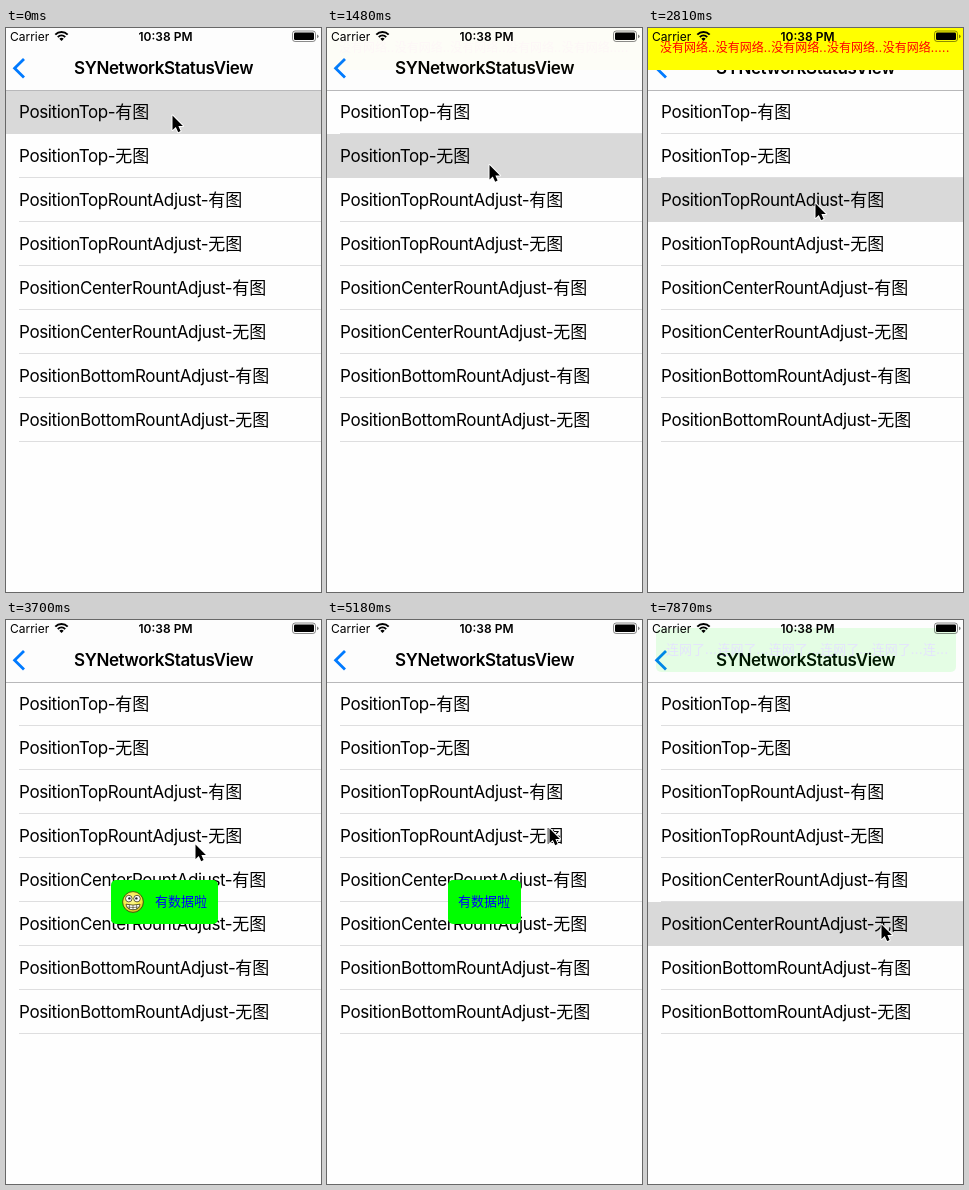
Recreate the animation shown at these times as an HTML page. Size 315 by 564 pixels, loop 8 s.

```html
<!DOCTYPE html>
<html lang="zh-CN">
<head>
<meta charset="utf-8">
<title>SYNetworkStatusView</title>
<style>
  html, body { margin: 0; width: 100%; height: 100%; overflow: hidden; background: #fefefe; }
  svg { display: block; }
  text { font-family: Inter, "Noto Sans CJK SC", "Noto Sans CJK", sans-serif; white-space: pre; }
  .label { font-size: 17px; letter-spacing: -.38px; }
  .title { font-weight: 600; text-anchor: middle; }
  .zh { font-family: "Noto Sans CJK SC", "Noto Sans CJK", sans-serif; letter-spacing: 0; }
  .status { font-size: 12px; }
  .clock { font-weight: 600; text-anchor: middle; }
  .dots { letter-spacing: .04em; }
</style>
</head>
<body>
<svg width="315" height="564" viewBox="0 0 315 564">
  <defs>
    <radialGradient id="skin" cx=".45" cy=".4" r=".6">
      <stop offset="0" stop-color="#fffca0"/>
      <stop offset=".75" stop-color="#f4e93c"/>
      <stop offset="1" stop-color="#c9b51c"/>
    </radialGradient>
    <g id="face" stroke="#3c3810" stroke-width=".8">
      <circle r="10.4" fill="url(#skin)"/>
      <g fill="#fff">
        <circle cx="-4.2" cy="-3.4" r="3.3"/>
        <circle cx="4" cy="-3.4" r="3.3"/>
        <path d="M-7 2.2Q0 4 7 2.2Q6.6 7.6 0 7.8Q-6.6 7.6-7 2.2Z"/>
      </g>
      <path d="M-6.4 5Q0 6 6.4 5M-3.6 3V7.2M0 3.2V7.8M3.6 3V7.2" fill="none" stroke-width=".6"/>
      <g fill="#222" stroke="none">
        <circle cx="-3.6" cy="-3.6" r="1.2"/>
        <circle cx="3.4" cy="-3.6" r="1.2"/>
      </g>
    </g>
  </defs>

  <rect width="315" height="564" fill="#fefefe"/>
  <g id="list"></g>

  <rect width="315" height="62" fill="#fdfdfd"/>
  <rect y="62" width="315" height="1" fill="#b8b8ba"/>
  <path d="M18 31L8.6 40.3 18 49.6" fill="none" stroke="#007aff" stroke-width="2.8"/>
  <text class="label title" x="157.5" y="46">SYNetworkStatusView</text>

  <g id="notices"></g>

  <text class="status" x="4" y="12.5">Carrier</text>
  <path d="M49.3 6.6A8.8 8.8 0 0 1 61.7 6.6M51.8 9.1A5.3 5.3 0 0 1 59.2 9.1" fill="none" stroke="#000" stroke-width="2"/>
  <path d="M55.5 13L53.3 10.8A3.1 3.1 0 0 1 57.7 10.8Z"/>
  <text class="status clock" x="159.5" y="12.5">10:38 PM</text>
  <rect x="286.5" y="3" width="23" height="10.5" rx="2.6" fill="none" stroke="#000" stroke-opacity=".45"/>
  <rect x="288" y="4.5" width="20" height="7.5" rx="1.2"/>
  <path d="M311 6.4Q312.6 7 312.6 8.3T311 10.2Z" fill-opacity=".5"/>

  <path id="cursor" d="M0 0V14.6L3.3 11.5 5.7 16.7 8.1 15.6 5.9 10.5H10.4Z" stroke="#fff" stroke-width="2" stroke-linejoin="round" paint-order="stroke"/>
</svg>
<script>
const LOOP = 8000;
const TICK = 148.3; // the picture advances in ticks
const find = id => document.getElementById(id);
const clamp = v => Math.min(1, Math.max(0, v));
const ease = v => { v = clamp(v); return v * v * (3 - 2 * v); };

// Table rows
const groups = ['Top', 'TopRountAdjust', 'CenterRountAdjust', 'BottomRountAdjust'];
const labels = groups.flatMap(g => ['有图', '无图'].map(zh => [`Position${g}-`, zh]));
find('list').innerHTML = labels.map(([name, zh], i) => {
  const y = 62 + 44 * i;
  return `<rect x="13" y="${y + 43}" width="302" height="1" fill="#dededf"/>
    <rect class="press" y="${y}" width="315" height="44" fill="#d9d9d9" opacity="0"/>
    <text class="label" x="13" y="${y + 28}">${name}<tspan class="zh">${zh}</tspan></text>`;
}).join('');

// One tap per row from the top: pressed at tick "down", its notice fades in from tick "show"
const offline = '没有网络..';
const online = '连网了...';
const bar = { fill: '#ff0', ink: '#f00', size: 12, x: -2, y: -2, w: 320, r: 0, pad: 14 };
const card = { fill: '#0f0', ink: '#00f', size: 13, x: 8, y: 8, w: 300, r: 5, pad: 10 };
const popup = { ...card, y: 260, text: '有数据啦' };
const taps = [
  { ...bar, down: 0, show: 1.3, icon: true, text: offline.repeat(4) + '没有...' },
  { ...bar, down: 10, show: 9.87, text: offline.repeat(5) + '...' },
  { ...popup, down: 19, show: 19.3, icon: true, x: 105, w: 107 },
  { ...popup, down: 33, show: 33, x: 121, w: 73 },
  { ...card, down: 40, show: 40.3, icon: true, text: online.repeat(4) + '连网...' },
  { ...card, down: 53, show: 52.7, text: online.repeat(5) + '连...' }
];
find('notices').innerHTML = taps.map(n => {
  const left = n.x + (n.icon ? 44 : n.pad);
  const text = n.text.replace(/\.+/g, d => `<tspan class="dots">${d}</tspan>`);
  return `<g class="notice">
    <rect x="${n.x}" y="${n.y}" width="${n.w}" height="44" rx="${n.r}" fill="${n.fill}"/>
    ${n.icon ? `<use href="#face" x="${n.x + 22}" y="${n.y + 22}"/>` : ''}
    <text class="zh" x="${left}" y="${n.y + 22 + n.size * .33}" font-size="${n.size}" fill="${n.ink}">${text}</text>
  </g>`;
}).join('');

// Pointer glides: first tick, last tick, end point
const home = [166.5, 87.5];
const glides = [
  [5, 8, 162.5, 137],
  [15, 17, 167.5, 175.5],
  [23, 25, 189.5, 224.5],
  [25, 28, 242, 262],
  [28, 31, 222.5, 208.5],
  [35, 38, 232.5, 251.5],
  [43, 46, 233, 315],
  [46, 50, 233.5, 304.5]
];
function pointer(n) {
  return glides.reduce(([x, y], [from, to, endX, endY]) => {
    const k = ease((n - from) / (to - from));
    return [x + (endX - x) * k, y + (endY - y) * k];
  }, home);
}

const rows = document.querySelectorAll('.press');
const notices = document.querySelectorAll('.notice');
function draw(now) {
  const n = Math.floor(now % LOOP / TICK + .1);
  taps.forEach((tap, i) => {
    const age = n - tap.show;
    const next = taps[i + 1];
    const replaced = next && n > next.show;
    rows[i].setAttribute('opacity', n < tap.down ? 0 : clamp((2 - age) / .9));
    notices[i].setAttribute('opacity', replaced ? 0 : ease(age / 1.6));
  });
  find('cursor').setAttribute('transform', `translate(${pointer(n)})`);
  requestAnimationFrame(() => draw(performance.now()));
}
draw(performance.now());
</script>
</body>
</html>
```
